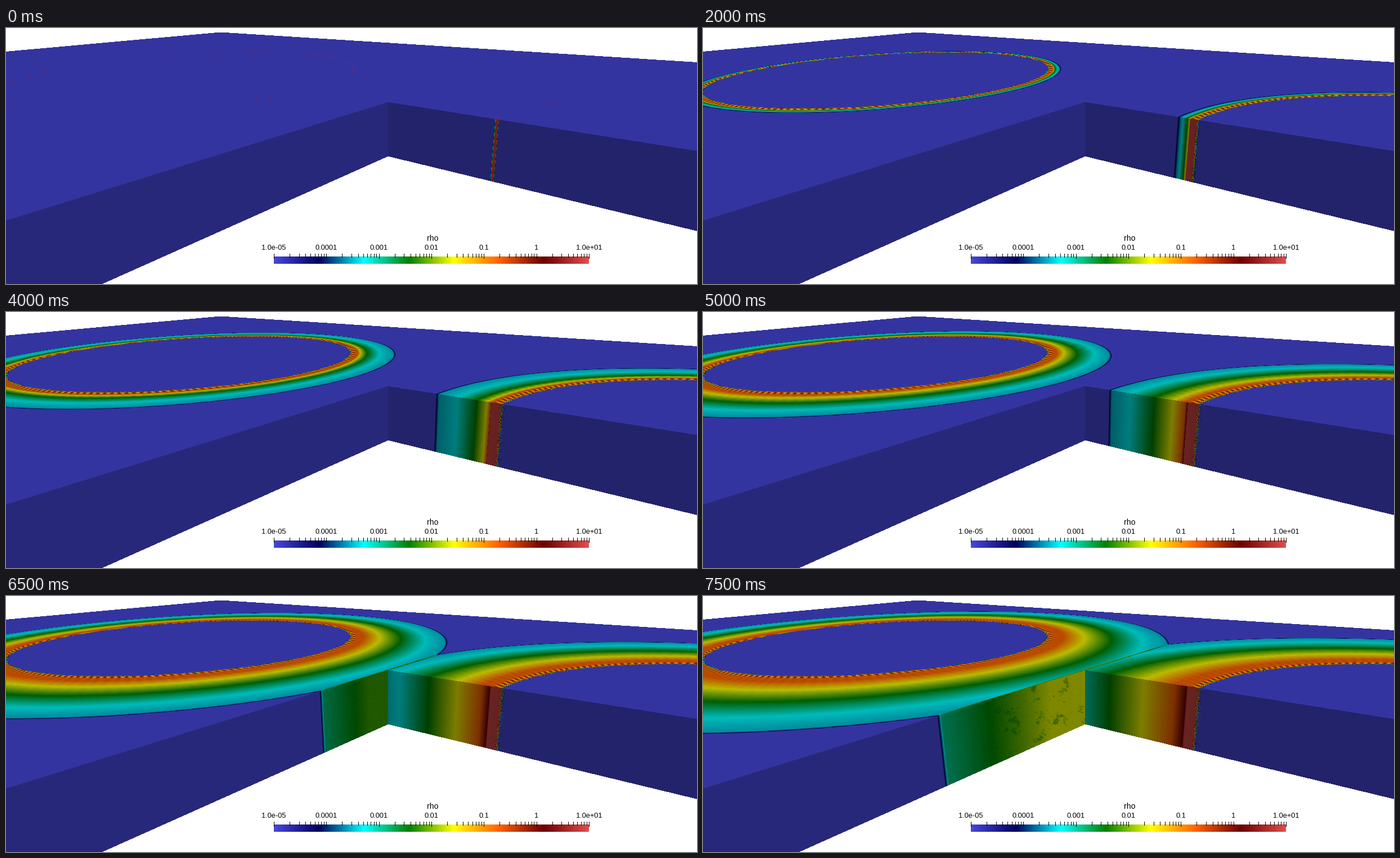
A matplotlib script for the animation above (8000 ms loop, 1228 by 456 pixels).

```python
import numpy as np
import matplotlib.pyplot as plt
from matplotlib.animation import FuncAnimation

W, H, DPI = 1228, 456, 64
FRAMES, STEP = 16, 500
RADIUS, CENTRE = 410, 613       # rod ring radius, distance of its axis from the mid plane
TOP, LEFT, RIGHT = 0.73, 0.56, 0.49   # face brightness

# Colour map on a log scale from 1e-5 to 1e1
STOPS = np.array([(71, 71, 219), (0, 0, 92), (0, 255, 255), (0, 128, 0),
                  (255, 255, 0), (255, 97, 0), (107, 0, 0), (224, 77, 77)])
LUT = np.stack([np.interp(np.linspace(0, 7, 256), range(8), STOPS[:, k])
                for k in range(3)], axis=1)

rng = np.random.default_rng(4)
px, py = np.meshgrid(np.arange(W) + 0.5, np.arange(H) + 0.5)


def fold(x0, y0, left, right):
    """Height of a bent edge with its corner at (x0, y0)."""
    return y0 + np.where(px < x0, (x0 - px) * left, (px - x0) * right)


edge = fold(679, 132, .3107, .1585)
base = fold(679, 228.6, .4477, .2425)
top = (py >= fold(381, 7.5, .0905, .0632)) & (py < edge)
wall = (py >= edge) & (py < base)
lwall, rwall = wall & (px < 679), wall & (px >= 679)


def to_plane(x, y):
    """Undo the perspective of the top face; the notch corner is the origin."""
    a, b, p = x - 1359, x + 420, 679 - x
    c, e, q = y + 79, y + 42, 132 - y
    det = a * e - b * c
    return (p * e - b * q) / det * 1156, (a * q - p * c) / det * 1352.5


def to_screen(X, Y):
    u, v = X / 1156, Y / 1352.5
    w = 1 + u + v
    return (679 + 1359 * u - 420 * v) / w, (132 - 79 * u - 42 * v) / w


def lift(x, y, slope):
    """Follow a vertical up to the top edge of its wall."""
    dx, dy = x - 679, y - 2500
    return 679 + dx * (132 - 2500) / (dy - slope * dx)


X, Y = to_plane(px[top], py[top])
d_top = np.hypot(X, np.abs(Y) - CENTRE) - RADIUS
theta = np.arctan2(X, np.abs(Y) - CENTRE)
beads = np.cos(200 * theta + d_top * 0.25) * np.exp(-(d_top / 6)**2)
ripple = np.cos(150 * theta + d_top * 0.12) * np.exp(-np.abs(d_top) / 60)

xe = lift(px[rwall], py[rwall], .1585)
d_right = CENTRE - (xe - 679) / (xe + 420) * 1352.5 - RADIUS
xe = lift(px[lwall], py[lwall], -.3107)
x_left = (679 - xe) / (1359 - xe) * 1156


def soft_noise(size):
    fy, fx = np.fft.fftfreq(H)[:, None], np.fft.rfftfreq(W)[None]
    spec = np.fft.rfft2(rng.normal(size=(H, W)))
    n = np.fft.irfft2(spec * np.exp(-(fx**2 + fy**2) * 20 * size**2), s=(H, W))
    return n / n.std()


patches = (soft_noise(5) + 0.4 * soft_noise(1.3))[lwall]
rough = rng.normal(size=(H, W))


def front(t):
    """Distance the flow has travelled from the rods after t seconds."""
    return max(3.5 + 6 * t, 25 * max(t - 1, 0)**1.295)


def density(d, t):
    core = 2 + 2 * min(t, 4)
    inner = -1 - core / 2
    far = front(t)
    # the profile starts steep and relaxes towards its final shape
    k = 1 + 1.2 * min(np.exp(4 - t), 1)
    marks = core + (far - core) * np.array([0, .01, .084, .29, .53, .79])**k
    drop = min(4, (far - marks[-1]) / 2)
    knots = [inner - min(4, 1 + 2 * t), inner, *marks, far - drop, far, far + drop / 2]
    levels = np.array([0, 6.85, 6.9, 6, 5, 4, 3, 2, 1.75, 1, 0]) / 7
    return np.interp(d, knots, levels)


def fray(d, noise, t):
    """Roughen the inner rim of the rod."""
    return d + np.where(d < -4, 1.5 * min(t / 4, 1) * noise, 0)


def reach(t):
    """Half width of the zone on the mid plane where both flows meet."""
    return np.sqrt(max((RADIUS + front(t))**2 - CENTRE**2, 0))


def collision(x, t):
    r, age = reach(t), t - 6.5
    if r == 0:
        return np.zeros_like(x)
    lv = np.minimum(.46 + .095 * age, .37 + (.15 + .15 * age) * (.92 - x / r))
    return np.minimum(lv, np.interp(r - x, [-1, 1, 6, 30], [0, .143, .37, .6]))


def top_level(t):
    if t == 0:
        return np.zeros_like(d_top)
    lv = density(fray(d_top, rough[top], t), t)
    lv = np.minimum(lv, .71 + .12 * beads)
    lv += .01 * ripple * ((d_top > 8) & (lv > .4))
    seam = (np.abs(Y) < 2.6) & (np.abs(X) < reach(t))
    return np.where(seam, np.minimum(collision(np.abs(X), t), .47), lv)


def left_level(t):
    lv = collision(x_left, t)
    if t >= 6.5:
        inner = np.clip(1.6 - 2 * x_left / reach(t), 0, 1)
        lv -= .06 * (t - 6.5)**2 * inner * np.clip(patches - 1, 0, 1)
        lv += .004 * rough[lwall] * (lv > .4)
    return lv


def right_level(t):
    return density(fray(d_right, rough[rwall], t), t)


def shade(level, light):
    idx = np.clip(np.rint(level * 255), 0, 255).astype(int)
    return np.rint(LUT[idx] * light).astype(np.uint8)


def make_backdrop():
    img = np.full((H, W, 3), 255, np.uint8)
    img[407:420, 476:1036] = shade(np.linspace(0, 1, 560), 1)[None]
    for k in range(6):
        for n in range(1, 10):
            col = round(476 + 560 / 6 * (k + np.log10(n)))
            img[402:411 if n == 1 else 409, col] = 0
    img[402:411, 1036] = 0
    return img


def make_specks():
    """Pixels where the thin rod first shows on the top face."""
    a = np.arange(90) * 2 * np.pi / 90 + rng.uniform(-.02, .02, 90)
    x, y = RADIUS * np.sin(a), RADIUS * np.cos(a)
    spots = []
    for side in (-1, 1):
        seen = (x >= 0) | (side > 0)
        sx, sy = to_screen(x[seen], side * CENTRE + y[seen])
        spots += [(int(i), int(j)) for i, j in zip(sx, sy)
                  if 1 <= i < W - 2 and rng.random() < .7]
    return spots


backdrop, specks = make_backdrop(), make_specks()


def render(t):
    img = backdrop.copy()
    img[top] = shade(top_level(t), TOP)
    img[lwall] = shade(left_level(t), LEFT)
    img[rwall] = shade(right_level(t), RIGHT)
    if t == 0:
        for x, y in specks:
            img[y, x - 1:x + 2] = (130, 42, 80)
    return img


fig = plt.figure(figsize=(W / DPI, H / DPI), dpi=DPI, facecolor="white")
ax = fig.add_axes([0, 0, 1, 1])
picture = ax.imshow(render(0), extent=(0, W, H, 0), interpolation="nearest", aspect="auto")
ax.set_xlim(0, W)
ax.set_ylim(H, 0)
ax.axis("off")


def label(x, y, text, size):
    ax.text(x, y, text, family="Liberation Sans", size=size * 72 / DPI,
            color="black", ha="center", va="baseline")


label(758, 379, "rho", 14)
for k, name in enumerate(["1.0e-05", "0.0001", "0.001", "0.01", "0.1", "1", "1.0e+01"]):
    label(476 + k * 560 / 6, 395, name, 12.75)


def draw(i):
    picture.set_data(render(i * STEP / 1000))
    return picture,


anim = FuncAnimation(fig, draw, frames=FRAMES, interval=STEP, repeat=True)
plt.show()
```
